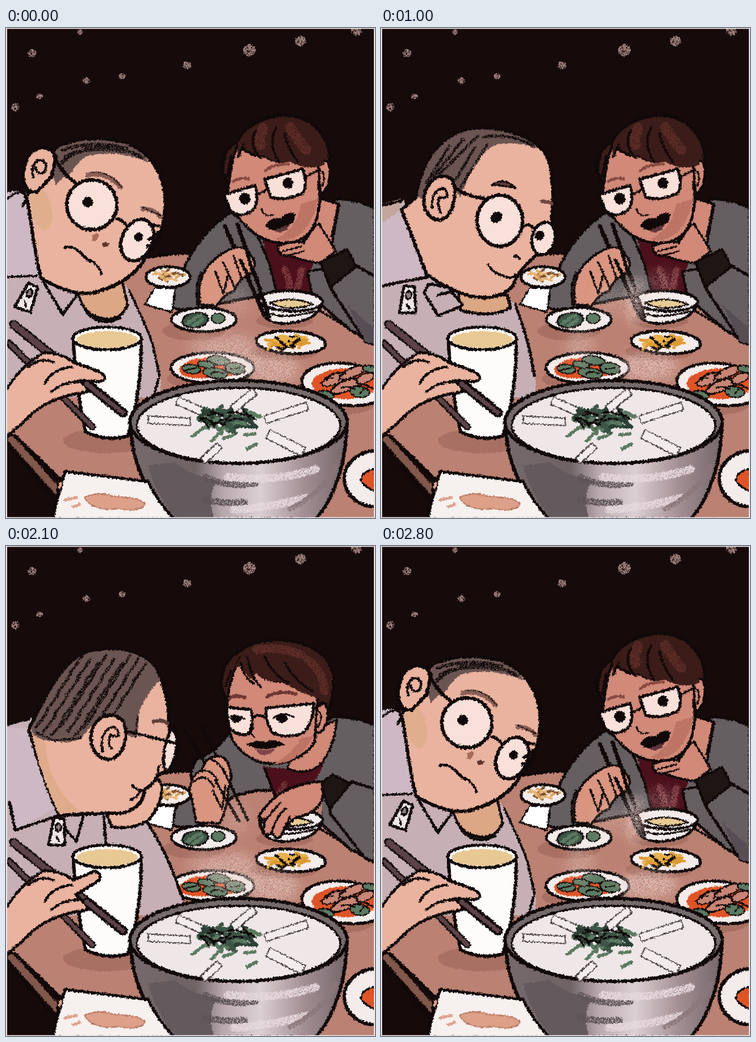
An HTML page for the animation above (3000 ms loop, 649 by 862 pixels).

```html
<!DOCTYPE html>
<html lang="en">
<head>
<meta charset="utf-8">
<title>Dinner for two</title>
<style>
html, body { margin: 0; width: 100%; height: 100%; overflow: hidden; background: #efe4e2; }
svg { display: block; width: 100vw; height: 100vh; }
path, ellipse { stroke-linecap: round; stroke-linejoin: round; }
</style>
</head>
<body>
<svg id="stage" viewBox="0 0 649 862" preserveAspectRatio="none"></svg>
<script>
const INK = '#110909', NIGHT = '#160a0a', SKIN = '#e9b39f', SKIN_LOW = '#dca785', ROSE = '#d18978', PALM = '#d9957f',
  LILAC = '#cdb8c3', SHIRT = '#c6b0b6', WOOL = '#665f61', WINE = '#4b101b', TABLE = '#bb8173', SHADE = '#a87063',
  HAIR = '#6b5552', BROWN = '#3b1c18', GLASS = '#f9e1d9', GREEN = '#5c7a62', LEAF = '#3c5546', RED = '#df5427',
  MIST = '#ecd2cb';

const shape = (d, fill, w = 0, ink = INK) =>
  `<path d="${d}" fill="${fill}"${w ? ` stroke="${ink}" stroke-width="${w}"` : ''}/>`;
const line = (d, w = 4.5, ink = INK) => shape(d, 'none', w, ink);
const oval = (x, y, rx, ry, fill, w = 0, turn = 0, extra = '') =>
  `<ellipse cx="${x}" cy="${y}" rx="${rx}" ry="${ry}" fill="${fill}" transform="rotate(${turn} ${x} ${y})"` +
  `${w ? ` stroke="${INK}" stroke-width="${w}"` : ''} ${extra}/>`;
const eye = (x, y, r, turn) => oval(x, y, r, r, INK, 0, turn, `class="eye" data-r="${r}"`);
const group = (id, body) => `<g id="${id}">${body}</g>`;
const chalk = body => `<g filter="url(#chalk)">${body}</g>`;
const stick = (d, w) => line(d, w) + line(d, w - 6, '#5b4347');

let seed = 7;
const rnd = () => (seed = seed * 16807 % 2147483647) / 2147483647;
const scatter = (n, draw) => Array.from({ length: n }, (_, i) => draw(i)).join('');

// short strokes strewn inside an oval
const heap = (x, y, rx, ry, n, len, w, inks) => scatter(n, i => {
  const a = rnd() * 6.28, r = Math.sqrt(rnd()), t = rnd() * 2.2 - 1.1;
  const px = x + rx * r * Math.cos(a), py = y + ry * r * Math.sin(a);
  const dx = len * Math.cos(t) / 2, dy = len * Math.sin(t) / 3;
  return line(`M${px - dx} ${py - dy}Q${px} ${py - 5} ${px + dx} ${py + dy}`, w, inks[i % inks.length]);
});

const defs = `<defs>
<filter id="rough" filterUnits="userSpaceOnUse" x="0" y="0" width="649" height="862" color-interpolation-filters="sRGB">
  <feTurbulence type="fractalNoise" baseFrequency=".3" numOctaves="2" seed="4"/>
  <feDisplacementMap in="SourceGraphic" scale="6" xChannelSelector="R" yChannelSelector="G"/>
</filter>
<filter id="chalk" filterUnits="userSpaceOnUse" x="0" y="0" width="649" height="862" color-interpolation-filters="sRGB">
  <feTurbulence type="fractalNoise" baseFrequency=".55" numOctaves="2" seed="9"/>
  <feColorMatrix values="0 0 0 0 0  0 0 0 0 0  0 0 0 0 0  8 0 0 0 -2.9"/>
  <feComposite in="SourceGraphic" operator="in"/>
</filter>
<filter id="soft" x="-50%" y="-50%" width="200%" height="200%"><feGaussianBlur stdDeviation="10"/></filter>
<linearGradient id="glaze"><stop offset="0" stop-color="#75696c"/><stop offset=".3" stop-color="#6f6366"/>
<stop offset=".43" stop-color="#b9a9ae"/><stop offset=".6" stop-color="#dccfd3"/><stop offset=".8" stop-color="#a28f94"/>
<stop offset="1" stop-color="#74666a"/></linearGradient>
</defs>`;

const stars = [[46, 44, 7.5], [130, 7, 5], [141, 93, 6.5], [204, 85, 6], [318, 66, 7], [428, 39, 11], [518, 23, 9.5],
  [616, 5, 9], [16, 139, 7.5], [59, 120, 5.5]];
const sky = alt => chalk(stars.map(([x, y, r], i) =>
  oval(x + (alt && i === 5 ? 3 : 0), y + (alt && i === 5 ? 4 : 0), alt ? r * .88 : r, alt ? r * .82 : r * .95, '#9d807c')).join(''));

const table = shape('M225 409L335 394L480 380L540 470L649 556V862H110L8 715L120 560Z', TABLE) +
  line('M235 406Q290 396 335 396M540 490L649 556', 4) +
  shape('M0 712L18 716L112 808L86 850L0 734Z', NIGHT) +
  line('M10 724L90 814', 13, '#82574c') + line('M16 718L104 802', 6) + line('M2 730L82 826', 5) +
  [[330, 533, 55, 17], [490, 569, 60, 16], [345, 617, 62, 18], [490, 515, 50, 14], [180, 726, 80, 22], [590, 660, 60, 20]]
    .map(([x, y, rx, ry]) => oval(x, y, rx, ry, SHADE)).join('');

const plate = (x, y, rx, ry, turn = 0) => oval(x, y, rx, ry, '#f4ecea', 5, turn);
const bits = (list, fill, turn) => list.map(([x, y, rx, ry]) => oval(x, y, rx, ry, fill, 2.5, turn)).join('');
const dishes = shape('M262 457L298 458L292 500L244 486Z', '#fff', 3) +
  plate(285, 438, 39, 18) + heap(286, 437, 22, 8, 14, 18, 4, ['#dca25c', '#e8b777', '#7c5134']) +
  plate(348, 513, 57, 21) + oval(333, 514, 23, 13, LEAF, 3, -8) + line('M318 520L342 505M330 524L346 512', 6, GREEN) +
  oval(373, 511, 12, 9, GREEN, 2) +
  shape('M446 480Q448 520 488 520Q548 517 556 484Z', '#f4ecea', 5) + oval(501, 480, 56, 18, '#f4ecea', 5, 2) +
  shape('M464 484Q500 470 540 486Q500 500 464 484Z', '#e6cb94', 3) + line('M456 500Q490 514 545 498', 3) +
  plate(501, 553, 61, 20, 3) + heap(492, 553, 36, 11, 26, 22, 5, ['#dd9a31', '#e7b04a', INK]) +
  plate(363, 598, 73, 27) + shape('M304 600Q320 578 365 580Q408 584 416 606Q380 618 330 616Q306 614 304 600Z', RED) +
  bits([[326, 600, 16, 8], [374, 585, 20, 8], [403, 599, 18, 10], [368, 607, 22, 9], [352, 592, 15, 6]], GREEN, 8) +
  line('M316 602L334 598M360 608Q372 602 384 608M394 600L412 598', 2.5) +
  plate(597, 627, 77, 37, 6) + oval(596, 626, 58, 27, RED) +
  bits([[578, 618, 24, 9], [610, 606, 26, 8], [598, 630, 28, 9], [632, 616, 16, 8]], '#c98575', -22) +
  bits([[562, 646, 15, 8], [622, 640, 17, 10], [640, 600, 13, 6]], GREEN, 10) +
  heap(598, 626, 44, 18, 7, 24, 2.5, [INK]) +
  oval(650, 793, 55, 49, '#f4ecea', 6) + shape('M649 776Q626 778 624 797Q634 810 649 815Z', RED, 3);

// ---- right diner ----
const rightA = {
  body: shape('M395 325Q440 350 480 360L584 300Q630 304 649 318V556L606 532L542 476L470 466L340 492Q296 502 288 484Q290 455 312 425Q340 360 395 325Z', WOOL, 5) +
    shape('M450 368L555 390L530 436L537 468L475 462Z', WINE) +
    chalk(line('M490 425Q500 440 498 462M520 425L512 460', 12, '#7d3a40')) +
    line('M440 362Q465 410 474 460M344 430Q330 455 338 488M530 430L540 475M532 428L556 424', 4) +
    shape('M553 300L586 310L574 378L520 382Z', ROSE, 4) + line('M584 312Q578 350 572 366') +
    shape('M570 456L616 418L649 437V556L632 552Z', WOOL, 5) + shape('M600 487L649 530V556L632 552Z', '#574d55'),
  head: shape('M386 262C366 240 388 210 408 199C428 162 478 146 516 158C556 170 576 214 567 246L548 262L392 280Z', BROWN, 5) +
    oval(557, 262, 12, 29, ROSE, 4, 8) + line('M553 250Q564 258 556 278', 3) +
    shape('M408 204C396 232 394 262 389 293C397 322 410 338 430 356C456 378 492 386 524 369C546 352 553 320 552 286L550 242Q520 244 498 232Q474 240 456 225Q430 228 408 204Z', ROSE, 4.5) +
    shape('M474 372C510 382 540 350 549 300L518 310Q514 350 474 372Z', '#bd7464') +
    shape('M408 202Q426 166 478 160Q540 168 561 240Q530 252 500 235Q478 241 454 225Q432 227 420 202Q416 214 406 226Z', BROWN) +
    chalk(line('M452 176Q444 192 448 206M500 174Q512 196 528 214', 18, '#5c2c27')) +
    line('M440 180Q425 205 448 229M475 175Q460 205 480 235M490 186Q496 214 514 236M418 205L408 228M386 225Q376 250 389 274M396 225L389 262', 4) +
    line('M400 270Q412 262 426 265M456 251Q472 238 496 240', 5, '#87493f') +
    shape('M384 293L438 277Q446 302 435 320Q410 338 394 320Z', GLASS, 5) +
    shape('M455 266L522 248Q531 272 522 290Q495 305 466 298Z', GLASS, 5) +
    line('M441 293L458 285M527 262L550 250M550 275L553 308') +
    eye(420, 300, 10, -12) + eye(496, 273, 9.5, -12) +
    line('M449 318Q452 332 470 329', 3) + shape('M464 350Q482 345 502 339Q496 358 482 360Q470 359 464 350Z', '#5f363b') +
    shape('M457 348Q466 333 482 337Q496 322 508 329Q505 346 487 348Q468 359 457 348Z', INK, 3),
  hand: shape('M477 384Q500 374 524 378Q538 352 550 344L580 392L553 414Q515 408 498 400Q480 404 477 384Z', ROSE, 4) +
    line('M484 394Q505 388 520 384M495 400Q515 396 524 392', 3) +
    shape('M553 412L600 389L616 420L570 456Z', '#1e1614', 4),
  grip: line('M385 349L455 506M407 345L463 508', 7) +
    shape('M342 486Q334 450 354 420Q374 396 402 386Q425 384 430 400Q445 414 430 432Q410 440 402 462Q384 468 370 489Z', PALM, 4) +
    line('M368 428L382 468L390 436M382 412L402 456M400 400L414 440', 3.5) + line('M412 408L428 440M422 388L434 430', 6)
};

const rightC = {
  body: shape('M400 318L470 350L578 300Q625 302 649 316V556L606 534L556 490L550 430L440 430L400 440L345 490Q298 502 290 484Q298 452 330 420Q318 400 336 374Q370 362 388 334Z', WOOL, 5) +
    shape('M400 456Q424 436 444 438L476 450L556 412V490L470 500Z', TABLE) +
    shape('M452 388Q520 398 560 380L542 418L474 450Z', WINE) + chalk(line('M490 418L478 440', 10, '#74323a')) +
    shape('M500 368L548 320L582 306Q576 360 552 385Q530 405 496 392Z', ROSE, 4) +
    line('M455 392Q470 430 476 450M330 430Q330 460 340 488') +
    shape('M570 425L610 415L649 428V556L632 550L570 470Z', WOOL, 5),
  head: shape('M390 275C366 236 386 196 412 185C442 158 512 160 546 184C582 206 580 250 568 286L545 282Z', BROWN, 5) +
    oval(553, 302, 12, 27, ROSE, 4, 10) + line('M549 290Q560 298 548 320', 3) +
    shape('M412 196C394 230 390 260 388 292C390 334 400 358 440 378C482 392 524 374 543 345L548 262Q510 250 486 238Q455 240 440 220Z', ROSE, 4.5) +
    shape('M470 384C505 382 530 360 540 334L518 338Q505 365 470 384Z', '#bd7464') +
    shape('M402 216Q415 180 450 172Q540 164 574 225L568 276L548 268Q510 256 488 238Q455 241 440 222Q434 250 414 210Z', BROWN) +
    chalk(line('M440 182Q485 176 520 192M530 200Q558 220 560 255', 15, '#5e2d28')) +
    line('M425 195Q430 230 448 248M412 205Q420 235 436 242M455 195Q470 228 496 240M490 205Q510 240 540 256M396 220L386 246', 4) +
    line('M393 268Q405 260 420 267M459 265Q480 253 510 260', 6, '#6f3730') +
    shape('M387 283L431 288Q437 312 427 330Q404 336 392 318Z', GLASS, 5) +
    shape('M457 285L541 277Q541 310 523 329Q490 340 468 328Q456 308 457 285Z', GLASS, 5) +
    line('M434 302Q444 294 456 302M541 288L556 278') +
    oval(405, 304, 9, 7, INK) + oval(485, 303, 10, 8, INK) + line('M392 302Q406 294 419 304M470 303Q486 290 506 301', 3) +
    line('M436 320Q426 330 437 336', 3) + shape('M438 356Q458 362 474 355Q466 369 450 368Q442 365 438 356Z', '#80434a') +
    shape('M425 349Q442 341 456 346Q470 338 489 349Q478 352 462 356Q440 357 425 349Z', INK, 2),
  hand: shape('M556 414Q515 417 488 432Q464 446 446 473Q448 486 456 480L452 504Q460 512 468 504Q475 520 484 510Q496 486 510 478Q550 470 558 440Z', ROSE, 4.5) +
    line('M456 482L482 452M468 504Q472 480 492 462M484 508L500 476', 4) +
    shape('M556 416L574 402L606 418L570 462Q558 445 556 416Z', '#1e1614', 4),
  grip: line('M316 326L410 484M345 318L425 482', 5) +
    shape('M334 486Q330 455 324 434Q322 404 345 394Q352 370 370 370Q386 368 392 386Q400 408 390 428Q392 454 376 488Z', PALM, 4) +
    line('M344 396Q360 392 372 412M358 374Q376 380 388 404M330 415Q350 396 366 424M364 430L380 464L386 422', 3.5) +
    line('M368 412L408 482M382 394L424 480', 4)
};

// ---- left diner ----
const tag = (x, y, turn) => `<g transform="translate(${x} ${y}) rotate(${turn})">` +
  shape('M-9 -24L9 -24L15 22L-14 24Z', '#efe6e6', 5) + oval(0, -8, 5, 7, '#8c7c80', 3) + line('M-2 8L4 16', 4) + '</g>';

const leftA = {
  body: shape('M0 292Q22 282 44 292L58 436L210 452L236 498L258 556L272 612V650H0Z', SHIRT) +
    shape('M0 290Q24 282 40 296L56 438L0 440Z', LILAC) + line('M0 438L54 436M2 300Q20 286 36 288', 4) + line('M216 460Q245 520 258 556L270 612L260 646', 4) +
    shape('M124 460L205 448L214 486Q206 510 180 512Q150 512 134 486Z', SKIN_LOW, 4.5) +
    line('M62 440L100 504L126 468L118 460M136 490Q160 530 200 510', 5) + tag(38, 474, 24),
  head: shape('M84 216C110 194 170 188 215 205C262 222 282 270 280 312C278 352 268 382 246 402C232 432 196 456 152 466C116 471 82 452 62 440C50 400 45 340 36 296Z', SKIN, 6) +
    oval(62, 318, 18, 38, '#dfae8d', 0, -12) +
    shape('M92 210Q150 186 215 206Q245 220 250 236Q190 212 140 226Q122 238 116 254Q100 262 88 276Q74 240 92 210Z', HAIR) +
    chalk(line('M100 215Q150 196 212 212M105 226Q150 204 225 220M96 240Q110 222 135 216M140 212Q190 202 240 228', 6)) +
    shape('M88 226C76 202 42 206 34 238C24 264 34 292 54 288L80 262Z', SKIN, 6) +
    line('M48 262C38 232 72 222 70 246C68 260 54 258 52 246M30 290Q40 300 30 312') +
    line('M84 224Q98 256 122 272', 6) +
    line('M144 259Q176 252 202 280M240 318Q260 318 272 332', 8, '#8b5f55') + chalk(line('M150 254Q180 250 203 279M242 316L272 330', 2.5)) +
    oval(151, 311, 44, 44, GLASS, 6) + oval(231, 373, 27, 38, GLASS, 6, 24) +
    line('M194 336Q204 336 213 348M252 346L268 348M248 384Q266 380 268 360L252 372', 5) +
    eye(144, 306, 9, 14) + eye(233, 368, 8, 10) +
    oval(157, 368, 5, 8, '#a86c58', 0, 30) + oval(175, 381, 6, 4, '#5e352c') +
    line('M103 386Q118 382 132 396Q142 408 152 411Q164 418 168 433', 4.5)
};

const leftB = {
  body: shape('M0 312L40 302L80 430L215 470L238 488L262 560L272 612V650H0Z', SHIRT) +
    shape('M0 314L36 318L82 438L0 454Z', LILAC) + shape('M0 310L36 300L34 320L0 345Z', '#c4a79c') +
    line('M0 454L82 438M36 320L82 438M2 312L36 304M236 486Q256 540 262 570L270 612', 5) +
    shape('M136 466L222 470L228 492Q190 512 140 496Z', SKIN_LOW, 5) +
    shape('M84 450L118 456L144 488L100 506L76 466Z', SHIRT, 5) + line('M100 470L130 462', 5) + tag(48, 478, 4),
  head: shape('M64 296C74 236 102 194 150 180C202 170 262 190 286 216C300 236 304 268 302 312Q298 340 306 360Q298 392 274 398Q262 410 248 424Q238 438 236 444C228 470 190 480 152 470C112 458 88 438 80 434C66 394 52 360 36 320Z', SKIN, 6) +
    shape('M64 298C74 236 102 196 150 181C200 172 254 188 276 212Q230 196 196 208Q166 230 154 262L140 298Q110 250 72 300Z', HAIR) +
    chalk(line('M80 272L120 208M92 262L145 195M104 256L170 190M132 266L165 210M140 280L186 206M180 192Q230 184 268 208', 5)) +
    shape('M75 302C78 266 108 250 126 268C136 292 126 332 106 337C86 340 76 322 75 302Z', SKIN, 6) +
    line('M90 316C86 284 118 270 116 296Q112 300 102 298Q98 312 106 326') + line('M132 282Q150 296 184 300', 6) +
    shape('M194 277Q214 260 238 282Q212 276 194 277Z', '#5f3d38', 3) + line('M283 304L300 308', 6, '#6f4740') +
    oval(286, 370, 20, 29, GLASS, 5, 14) + oval(209, 339, 40, 45, GLASS, 6) + line('M248 352Q260 340 270 354', 5) +
    oval(203, 333, 11, 9, INK, 0, -40) + oval(279, 365, 9, 8, INK, 0, -35) +
    line('M234 402Q240 398 243 406M188 416Q198 432 212 435Q232 444 236 434', 4)
};

const leftC = {
  body: shape('M0 316L44 302L92 440L178 474L246 484L288 552L312 622L300 650H0Z', SHIRT) +
    shape('M0 318L38 322L84 462L14 500L0 440Z', LILAC) + line('M6 450L16 500L92 474M2 314L40 304', 5) +
    line('M172 476L176 526M246 482Q282 540 296 580L312 622', 5) + line('M96 476L106 500L124 520L136 474', 5) + tag(91, 503, 6),
  head: shape('M172 460L186 494Q224 500 250 482Q274 460 274 420L262 402L216 420Z', SKIN, 5) +
    shape('M40 322C74 260 96 214 136 190C182 174 240 180 264 220C276 238 284 264 286 296L288 330L300 350Q298 382 286 394L266 404Q262 418 244 428Q240 462 204 470Q150 470 94 474C74 434 58 386 40 322Z', SKIN, 6) +
    shape('M46 332L70 346Q72 420 130 466L94 472Q62 410 46 332Z', '#e0ab8b') +
    shape('M44 322C74 262 96 214 136 191C182 176 238 182 262 216L272 236Q244 260 232 300L228 338L206 330L200 300Q176 290 154 312L132 338Q110 350 84 343Q62 344 48 332Z', HAIR) +
    chalk(scatter(36, i => {
      const row = Math.floor(i / 9), x = 122 + i % 9 * 14 - row * 20, y = 208 + row * 32 + i % 3 * 7;
      return line(`M${x - 10} ${y + 15}Q${x + 4} ${y} ${x + 12} ${y - 16}`, 5);
    }) + line('M52 328L84 342L132 338M232 300L228 336', 4)) +
    shape('M150 346C144 304 184 284 206 308C218 336 206 372 180 376C160 372 154 362 150 346Z', SKIN, 6) +
    line('M170 362C160 324 196 302 198 334Q190 336 184 332Q178 348 186 356', 4) +
    oval(289, 358, 10, 38, GLASS, 5, 10) + line('M214 326L298 347M292 322Q308 340 301 366', 5) +
    line('M260 309Q272 304 284 312', 7, '#5f3d38') + line('M222 420Q232 434 246 428M236 430Q232 442 220 446M270 386Q264 394 270 402', 4)
};

const cup = shape('M118 546Q124 640 140 710Q172 728 214 718Q238 650 238 546Z', '#fefcfb', 6) +
  oval(178, 546, 60, 20, '#fefcfb', 5) + oval(178, 548, 54, 15, '#e8c994');
const holding = finger => stick('M6 555L152 702', 13) + stick('M14 522L206 677', 17) +
  shape(`M0 636Q30 590 68 571Q100 572 118 588${finger}Q142 628 144 640Q112 644 92 652Q60 662 30 694L0 720Z`, SKIN) +
  line(`M2 634Q30 590 68 571Q100 572 118 588${finger}Q142 628 144 640Q112 644 92 652Q60 662 30 694L2 718`, 5) +
  line('M68 626Q80 600 116 596M80 640Q100 622 130 622M40 596Q60 578 84 588', 4.5) + stick('M142 626L206 677', 14);
const handA = holding('Q150 598 170 608Q180 620 162 622L128 620');
const handC = holding('L156 572Q170 576 164 588L122 614');

const radish = (x, y, w, h, turn) =>
  `<rect x="${-w / 2}" y="${-h / 2}" width="${w}" height="${h}" transform="translate(${x} ${y}) rotate(${turn})" fill="#f3ecec" stroke="#4a4040" stroke-width="2"/>`;
const bowl = shape('M218 690Q220 790 290 864H545Q598 800 600 690Z', 'url(#glaze)', 6) +
  shape('M296 764Q330 790 372 796Q352 822 366 862H300Q262 820 250 770Z', '#64595c') +
  chalk(line('M350 790Q400 812 440 800M350 830Q390 838 420 834', 11, '#5e5356') +
    line('M390 790Q470 800 545 776M400 848Q470 842 530 826', 14, '#e6d8dd') +
    line('M500 846Q560 815 580 770', 9, '#8a777c')) +
  oval(409, 693, 191, 73, '#766b6b', 6) + oval(409, 699, 179, 66, '#efe7e7', 4) +
  [[287, 691, 74, 13, 3], [325, 666, 52, 14, 24], [418, 655, 50, 14, -40], [493, 677, 78, 14, -18],
    [492, 730, 70, 17, 27], [361, 748, 40, 13, -42]].map(r => radish(...r)).join('') +
  heap(390, 689, 50, 17, 34, 30, 7, [LEAF, '#2c4035', GREEN]) +
  line('M328 718L350 702M362 726L384 704M382 722L400 716M420 716L438 714M424 740L440 732', 6, GREEN) + heap(390, 690, 48, 15, 12, 26, 3, [INK]);

const paper = shape('M104 780L250 798Q266 832 296 864H80Z', '#f6f1ef', 5) + line('M92 806L84 860', 4) +
  shape('M138 826Q160 814 190 824Q240 826 244 838Q236 852 196 846Q150 850 138 826Z', '#dda088', 2, '#b8755f') +
  line('M104 830L124 826M118 842L130 838M96 800L94 808', 5, '#dca28c');

const vapours = [
  [[400, 575, 46, 36, .55], [346, 560, 26, 24, .35], [470, 600, 46, 26, .6], [405, 480, 22, 30, .25]],
  [[380, 550, 50, 24, .3], [440, 590, 60, 22, .4], [405, 460, 20, 30, .2]],
  [[446, 480, 15, 42, .75], [490, 446, 28, 20, .25], [350, 560, 26, 34, .35], [470, 596, 52, 24, .65], [400, 480, 24, 28, .25]]
];
const steam = list => chalk(`<g filter="url(#soft)">${list.map(([x, y, rx, ry, o]) =>
  oval(x, y, rx, ry, MIST, 0, 0, `opacity="${o}"`)).join('')}</g>`);

const left = { A: leftA, B: leftB, C: leftC }, right = { A: rightA, C: rightC };
const stage = document.getElementById('stage');
stage.innerHTML = defs + `<rect width="649" height="862" fill="${NIGHT}"/><g filter="url(#rough)">` +
  group('sky0', sky(0)) + group('sky1', sky(1)) + table +
  Object.keys(right).map(k => group('rb' + k, right[k].body + group('rh' + k, right[k].head))).join('') +
  dishes + Object.keys(right).map(k => group('rf' + k, right[k].hand + right[k].grip)).join('') +
  vapours.map((v, i) => group('steam' + i, steam(v))).join('') +
  Object.keys(left).map(k => group('l' + k, left[k].body + group('lh' + k, left[k].head))).join('') +
  cup + group('holdA', handA) + group('holdC', handC) + bowl + paper +
  '</g><path d="M1 0V862M648 0V862M0 .5H649M0 861.5H649" fill="none" stroke="#efe4e2" stroke-width="2"/>';

const $ = id => document.getElementById(id);
const eyes = [...stage.querySelectorAll('.eye')];
const show = (id, on) => $(id).setAttribute('display', on ? 'inline' : 'none');

// start ms, left pose, right pose, head tilt, eye opening, sky, steam
const steps = [
  [0, 'A', 'A', 0, 1, 0, 0], [200, 'A', 'A', 0, 1, 0, 1], [300, 'A', 'A', 0, .5, 1, 2], [400, 'A', 'A', 0, .15, 1, 0],
  [500, 'A', 'A', 0, .5, 1, 1], [600, 'A', 'A', 0, 1, 0, 2], [700, 'A', 'A', 0, 1, 0, 0], [800, 'A', 'A', 0, 1, 0, 1],
  [900, 'B', 'A', -5, 1, 0, 1], [1000, 'B', 'A', 0, 1, 0, 2], [1100, 'C', 'C', 3, 1, 0, 2], [1200, 'C', 'C', 0, 1, 0, 0],
  [1400, 'C', 'C', 0, 1, 0, 1], [1500, 'C', 'C', 0, 1, 0, 2], [1800, 'C', 'C', 0, 1, 0, 1], [2100, 'C', 'C', 0, 1, 0, 0],
  [2300, 'C', 'C', 3, 1, 0, 1], [2400, 'B', 'A', 0, 1, 0, 2], [2500, 'B', 'A', -5, 1, 0, 1], [2600, 'A', 'A', 0, 1, 0, 0],
  [2800, 'A', 'A', 0, 1, 0, 2]
];

let current;
function draw(ms) {
  const step = steps.filter(s => s[0] <= ms % 3000).pop();
  if (step === current) return;
  current = step;
  const [, lp, rp, tilt, open, skyNo, steamNo] = step;
  for (const k in left) show('l' + k, k === lp);
  for (const k in right) {
    show('rb' + k, k === rp);
    show('rf' + k, k === rp);
    show('hold' + k, (k === 'C') === (lp === 'C'));
  }
  $('lh' + lp).setAttribute('transform', `rotate(${tilt} 130 460)`);
  $('rhC').setAttribute('transform', `rotate(${-tilt} 500 390)`);
  for (const e of eyes) e.setAttribute('ry', e.dataset.r * open);
  [0, 1].forEach(i => show('sky' + i, i === skyNo));
  [0, 1, 2].forEach(i => show('steam' + i, i === steamNo));
}

const start = performance.now();
function tick() {
  draw(performance.now() - start);
  requestAnimationFrame(tick);
}
draw(0);
requestAnimationFrame(tick);
</script>
</body>
</html>
```
